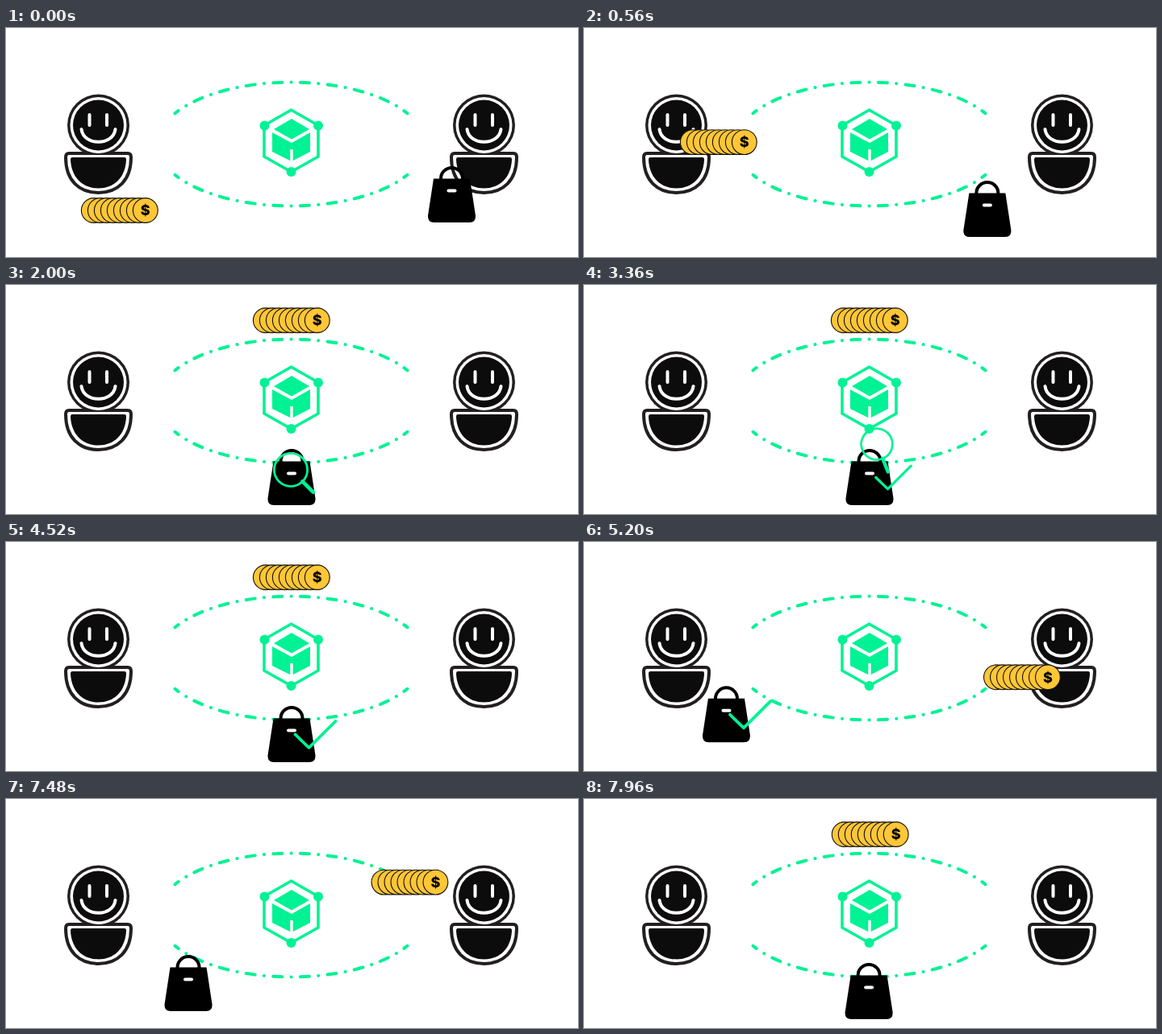
These frames come from a looping animation (709 by 285 pixels, 8 s). An HTML page:

```html
<!DOCTYPE html>
<html lang="en">
<head>
<meta charset="utf-8">
<title>Blockchain exchange</title>
<style>
  html, body { margin: 0; width: 100%; height: 100%; overflow: hidden; background: #fff; }
  svg { display: block; width: 709px; height: 285px; }
  .line { fill: none; stroke: #00f294; }
  .round { stroke-linecap: round; stroke-linejoin: round; }
  text { font: 800 18px Inter, "Liberation Sans", sans-serif; text-anchor: middle; }
</style>
</head>
<body>
<svg viewBox="0 0 709 285">
  <defs>
    <g id="person">
      <circle cx="114.500" cy="121" r="38.500" fill="#231f20"/>
      <path d="M78 156H151Q155 156 155 161C155 190 138 205 114.500 205S74 190 74 161Q74 156 78 156Z" fill="#fff" stroke="#231f20" stroke-width="4"/>
      <path d="M82 161H147Q149 161 149 164C148 186 134 199.500 114.500 199.500S81 186 80 164Q80 161 82 161Z" fill="#0c0c0c"/>
      <circle cx="114.500" cy="121" r="35" fill="#fff"/>
      <circle cx="114.500" cy="121" r="31.500" fill="#0c0c0c"/>
      <path class="round" d="M103.500 108V121M125 108V121M93.500 126C96 147 133 147 135.500 126" fill="none" stroke="#fff" stroke-width="4"/>
    </g>
  </defs>

  <g class="line round" stroke-width="4" stroke-dasharray="11 11.300 .1 11.300" stroke-dashoffset="5.500">
    <path d="M209.500 106.200A166 77 0 0 1 497.500 106.200"/>
    <path d="M209.500 182.800A166 77 0 0 0 497.500 182.800"/>
  </g>

  <path class="line" d="M353.500 102L387 121.300V160L353.500 179L320 160V121.300Z" stroke-width="3.600"/>
  <g fill="#00f294">
    <circle cx="320.500" cy="121.500" r="6"/>
    <circle cx="387" cy="121.500" r="6"/>
    <circle cx="353.500" cy="179" r="6"/>
    <path d="M354 113L376 126L354 138.500L332 126Z"/>
    <path d="M330 130L354 143L377 130V154L354 166L330 154Z"/>
  </g>
  <path d="M354 151V168" stroke="#fff" stroke-width="3.500"/>

  <use href="#person"/>
  <use href="#person" x="478"/>

  <g id="coins"></g>

  <g id="bag">
    <path d="M-13.500 18V15A13.500 13.500 0 0 1 13.500 15V18" fill="none" stroke="#000" stroke-width="4"/>
    <path d="M-22.500 15H22.500L29.500 61Q30 69.500 22 69.500H-22Q-30 69.500 -29.500 61Z"/>
    <path class="round" d="M-4 30H4" stroke="#fff" stroke-width="4"/>
    <path id="check" class="line round" d="M4.500 35L21.500 51.500L54.500 18.500" stroke-width="3.800"/>
  </g>

  <g id="lens" class="line">
    <circle r="20" stroke-width="2.800"/>
    <path class="round" d="M14 14L27 27" stroke-width="4.500"/>
  </g>
</svg>
<script>
const LOOP = 8000, STEP = 40;
const $ = id => document.getElementById(id);
const clamp = p => Math.min(1, Math.max(0, p));
const smooth = p => p * p * (3 - 2 * p);
const span = (t, start, length) => clamp((t - start) / length);

$("coins").innerHTML = Array.from({ length: 9 }, (_, i) =>
  `<circle cx="${15.8 + i * 8}" cy="16" r="15.4" fill="#ffc636" stroke="#111" stroke-width="1.1"/>`
).join("") + '<text x="79.800" y="22.300">$</text>';

// Each item curves from the middle to one of two sides; bend = [x1, x2, y2].
const coins = { mid: [306, 28], first: [93, 211], last: [504.5, 203.5], bend: [.55, 1, .48] };
const bag = { mid: [354, 204.5], first: [552.5, 172.5], last: [141.5, 165], bend: [.5, .7, .255] };

function place(id, item, side, u) {
  const [x1, x2, y2] = item.bend, v = 1 - u;
  const fx = 3 * u * v * v * x1 + 3 * u * u * v * x2 + u ** 3;
  const fy = 3 * u * u * v * y2 + u ** 3;
  const [mx, my] = item.mid, [sx, sy] = item[side];
  $(id).setAttribute("transform", `translate(${mx + (sx - mx) * fx} ${my + (sy - my) * fy})`);
}

function draw(t) {
  const side = t < 3000 ? "first" : "last";
  const u = t < 3000 ? 1 - span(t, 0, 1000) ** 2
    : t < 7000 ? smooth(span(t, 4520, 945))
    : 1 - smooth(span(t, 7010, 980));
  place("coins", coins, side, u);
  place("bag", bag, side, u);

  const grow = t < 7040 ? 1 - (1 - span(t, 3040, 500)) ** 2 : 0;
  $("check").style.display = grow > 0 ? "" : "none";
  $("check").setAttribute("transform", `translate(29.500 35) scale(${grow}) translate(-29.500 -35)`);

  const enter = span(t, 1520, 480), leave = span(t, 3000, 920);
  const lift = smooth(leave);
  const size = enter * (1 - leave ** 3);
  $("lens").style.display = size > 0 ? "" : "none";
  const x = 353 + 10 * Math.sin(Math.PI * clamp(leave * 1.25));
  $("lens").setAttribute("transform",
    `translate(${x} ${230 - 94 * lift}) rotate(${68 * lift}) scale(${size * 1.03})`);
}

function tick(now) {
  draw(Math.floor((now % LOOP) / STEP) * STEP);
  requestAnimationFrame(tick);
}
draw(0);
requestAnimationFrame(tick);
</script>
</body>
</html>
```
